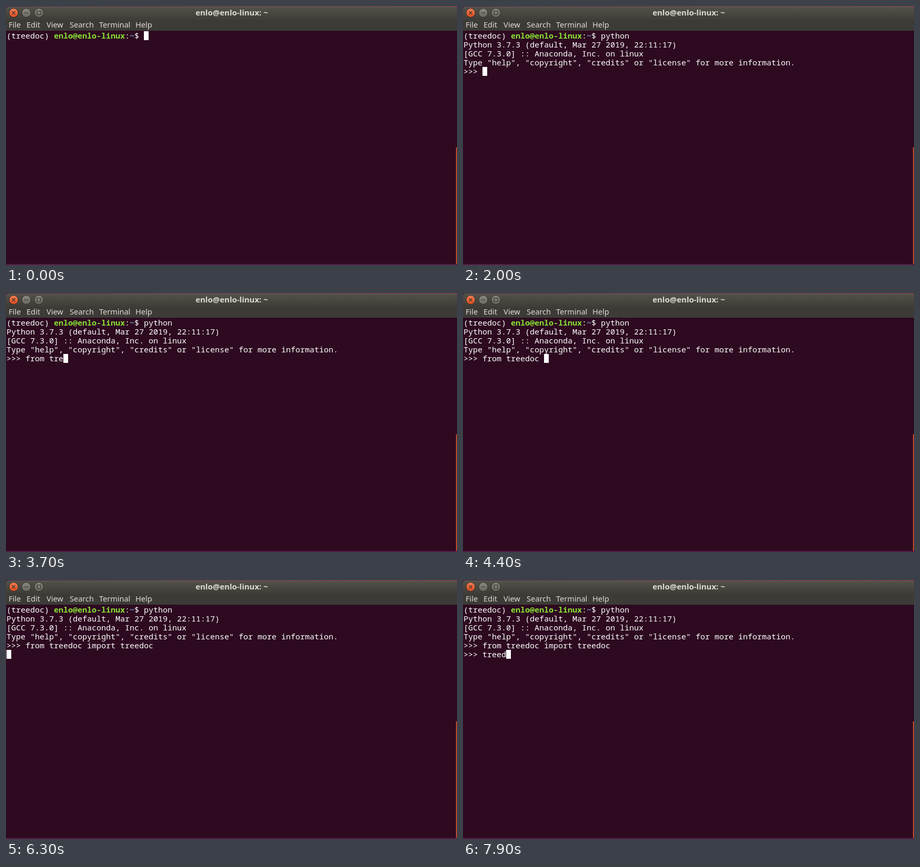
These frames come from a looping animation (857 px wide and 493 px high, 8000 ms). An HTML page:

```html
<!DOCTYPE html>
<html lang="en">
<head>
<meta charset="utf-8">
<title>Terminal session</title>
<style>
  html, body { margin: 0; width: 100%; height: 100%; overflow: hidden; background: #2d0a20; }
  svg { display: block; width: 857px; height: 493px; }
  text { white-space: pre; }
  .ui { font-family: "Noto Sans", "Open Sans", sans-serif; fill: #dfdbd2; }
  .title { font-size: 15px; font-weight: 700; text-anchor: middle; }
  .menu { font-size: 14.5px; }
  .term { font: 15px "Noto Sans Mono", "DejaVu Sans Mono", monospace; fill: #fff; }
  .user { fill: #8ae234; font-weight: 700; }
  .path { fill: #729fcf; font-weight: 700; }
</style>
</head>
<body>
<svg viewBox="0 0 857 493" xmlns="http://www.w3.org/2000/svg">
  <defs>
    <linearGradient id="bar" x1="0" y1="0" x2="0" y2="1">
      <stop offset="0" stop-color="#5b5a51"/>
      <stop offset=".12" stop-color="#504f47"/>
      <stop offset="1" stop-color="#3c3b37"/>
    </linearGradient>
    <linearGradient id="desk">
      <stop offset="0" stop-color="#4a2043"/>
      <stop offset=".5" stop-color="#7c2f55"/>
      <stop offset="1" stop-color="#8c3550"/>
    </linearGradient>
    <linearGradient id="red" x1="0" y1="0" x2="0" y2="1">
      <stop offset="0" stop-color="#f58058"/>
      <stop offset="1" stop-color="#dd4a1c"/>
    </linearGradient>
    <linearGradient id="gray" x1="0" y1="0" x2="0" y2="1">
      <stop offset="0" stop-color="#8b897f"/>
      <stop offset="1" stop-color="#69675f"/>
    </linearGradient>
  </defs>

  <rect width="857" height="493" fill="#2d0a20"/>
  <rect width="857" height="8" fill="url(#desk)"/>
  <path d="M0 28V6Q0 1 5 1H852Q857 1 857 6V28Z" fill="url(#bar)"/>
  <rect y="27" width="857" height="20" fill="#3c3b37"/>
  <rect x="856" y="47" width="1" height="222" fill="#24081f"/>
  <rect x="855" y="269" width="2" height="222" fill="#c2482a"/>
  <rect y="491" width="857" height="2" fill="#561a45"/>

  <g stroke="#33322d" stroke-width="1">
    <circle cx="14.5" cy="13" r="8.5" fill="url(#red)"/>
    <circle cx="38.5" cy="13" r="8.5" fill="url(#gray)"/>
    <circle cx="62.5" cy="13" r="8.5" fill="url(#gray)"/>
    <path d="M11.5 10l6 6m0-6l-6 6M34.5 13h8M59 9.5h7v7h-7z" fill="none" stroke-width="1.2"/>
  </g>
  <text class="ui title" x="429" y="18">enlo@enlo-linux: ~</text>
  <g id="menu" class="ui menu"></g>
  <g id="lines" class="term"></g>
  <rect id="cursor" width="9" height="17" fill="#fff"/>
</svg>

<script>
const LOOP = 8000, CELL = 9, ROW = 17, LEFT = 1, TOP = 48;
const $ = id => document.getElementById(id);

function addText(parent, x, y, str = "") {
  const el = document.createElementNS("http://www.w3.org/2000/svg", "text");
  el.setAttribute("x", x);
  el.setAttribute("y", y);
  el.textContent = str;
  parent.append(el);
  return el;
}

function addSpan(line, cls, str = "") {
  const el = document.createElementNS("http://www.w3.org/2000/svg", "tspan");
  if (cls) el.setAttribute("class", cls);
  el.textContent = str;
  line.append(el);
  return el;
}

Object.entries({ File: 5, Edit: 39, View: 77, Search: 121, Terminal: 177, Help: 246 })
  .forEach(([name, x]) => addText($("menu"), x, 41, name));

const lines = Array.from({ length: 6 }, (_, r) => addText($("lines"), LEFT, TOP + 14 + r * ROW));
const prompt = [["", "(treedoc) "], ["user", "enlo@enlo-linux"], ["", ":"], ["path", "~"], ["", "$ "]];
prompt.forEach(([cls, str]) => addSpan(lines[0], cls, str));
const shellInput = addSpan(lines[0]);
const promptLength = prompt.reduce((n, [, str]) => n + str.length, 0);

const banner = [
  "Python 3.7.3 (default, Mar 27 2019, 22:11:17)",
  "[GCC 7.3.0] :: Anaconda, Inc. on linux",
  'Type "help", "copyright", "credits" or "license" for more information.'
];

// Each burst of keys is [time, text].
const shellKeys = [[500, "p"], [900, "y"], [1200, "t"], [1300, "ho"], [1400, "n"]];
const importKeys = [
  [2900, "f"], [3000, "ro"], [3100, "m"], [3500, " t"], [3700, "re"], [4000, "e"],
  [4200, "d"], [4300, "oc"], [4400, " "], [4600, "i"], [4700, "m"], [4800, "p"],
  [5000, "o"], [5200, "rt"], [5400, " t"], [5800, "re"], [6000, "e"], [6100, "d"], [6200, "oc"]
];
const callKeys = [[7300, "t"], [7400, "re"], [7600, "e"], [7900, "d"]];
const PYTHON_READY = 2000, IMPORT_ENTER = 6300, IMPORT_DONE = 6500;
const blinks = [[2400, 2600], [6900, 7100]];

const typed = (keys, t) => keys.filter(([at]) => at <= t).map(([, str]) => str).join("");

function draw(t) {
  const shell = typed(shellKeys, t);
  const ready = t >= PYTHON_READY;
  const first = ready ? ">>> " + typed(importKeys, t) : "";
  const second = t >= IMPORT_DONE ? ">>> " + typed(callKeys, t) : "";

  shellInput.textContent = shell;
  banner.forEach((str, i) => lines[i + 1].textContent = ready ? str : "");
  lines[4].textContent = first;
  lines[5].textContent = second;

  const [row, col] = t >= IMPORT_ENTER ? [5, second.length]
    : ready ? [4, first.length]
    : [0, promptLength + shell.length];
  const hidden = blinks.some(([off, on]) => t >= off && t < on);
  $("cursor").setAttribute("x", LEFT + col * CELL);
  $("cursor").setAttribute("y", TOP + row * ROW);
  $("cursor").setAttribute("visibility", hidden ? "hidden" : "visible");
}

const start = performance.now();
function tick() {
  draw((performance.now() - start) % LOOP);
  requestAnimationFrame(tick);
}
tick();
</script>
</body>
</html>
```
